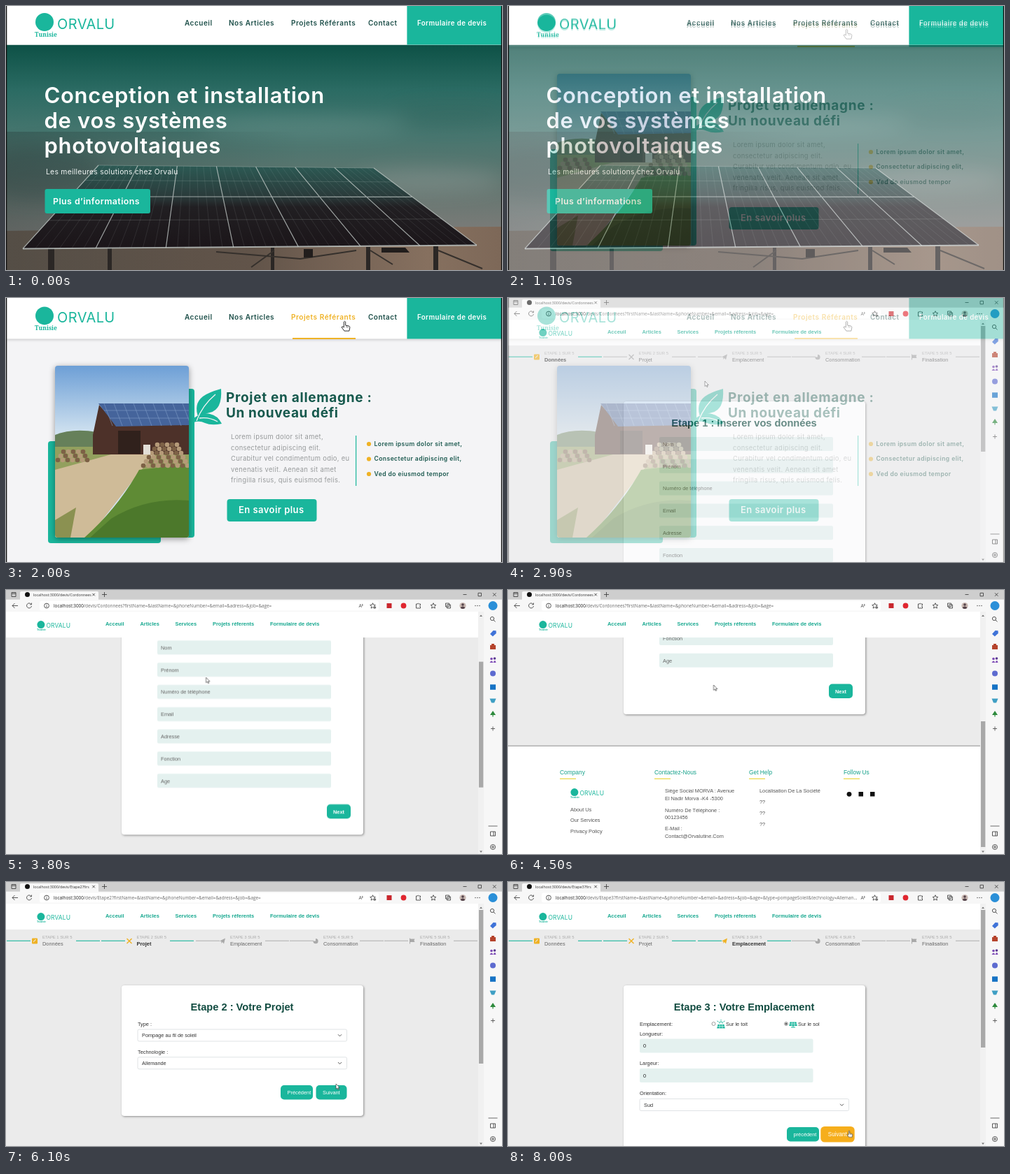
Recreate the animation shown at these times as an HTML page. Size 708 by 378 pixels, loop 8.1 s.

```html
<!DOCTYPE html>
<html lang="fr">
<head>
<meta charset="utf-8">
<title>Devis photovoltaïque</title>
<style>
html, body { margin: 0; width: 100%; height: 100%; overflow: hidden; background: #fff; }
svg { display: block; width: 100vw; height: 100vh; }
text { font-family: "Liberation Sans", Arial, sans-serif; white-space: pre; }
.m { font-family: Inter, "Open Sans", sans-serif; }
.s { font-family: "Open Sans", "Noto Sans", sans-serif; }
.card { fill: #fff; filter: drop-shadow(1.5px 1.5px 1.5px #8a8a8a); }
.shade { filter: drop-shadow(0 1px 2px #0003); }
.ln { fill: none; stroke: #444; stroke-width: .9; }

.project, .browser, .under, .hover, .p1, .p2, .p3, .scroll, .thumb,
.cursor, .arrow, .hand, .b1, .b2, .b3 { animation: 8.1s linear infinite; }

.project { animation-name: project; }
.browser { animation-name: browser; }
@keyframes project { 0%, 10.494% { opacity: 0 } 20.988%, 100% { opacity: 1 } }
@keyframes browser { 0%, 29.63% { opacity: 0 } 39.506%, 100% { opacity: 1 } }

.under { animation-name: under; transform-origin: 454px 58px; }
@keyframes under { 0%, 8.642% { transform: scaleX(0) } 13.58% { transform: scaleX(.9) } 16.05%, 100% { transform: none } }
.hover { animation-name: hover; }
@keyframes hover { 0%, 11.111% { fill: #1d4f49 } 17.284%, 100% { fill: #efb225 } }

.p1 { animation-name: p1; animation-timing-function: step-end; }
.p2 { animation-name: p2; animation-timing-function: step-end; }
.p3 { animation-name: p3; animation-timing-function: step-end; }
@keyframes p1 { 0% { visibility: visible } 65.432%, 100% { visibility: hidden } }
@keyframes p2 { 0% { visibility: hidden } 65.432% { visibility: visible } 85.185%, 100% { visibility: hidden } }
@keyframes p3 { 0% { visibility: hidden } 85.185%, 100% { visibility: visible } }

.scroll { animation-name: scroll; }
.thumb { animation-name: thumb; }
@keyframes scroll {
  0%, 40.741% { transform: none; animation-timing-function: ease-in-out }
  54.321%, 100% { transform: translateY(-299px) }
}
@keyframes thumb {
  0%, 40.741% { transform: none; animation-timing-function: ease-in-out }
  54.321%, 100% { transform: translateY(148px) }
}

.cursor { animation-name: cursor; }
@keyframes cursor {
  0%, 41.975% { transform: translate(281px, 119px) }
  55.556%, 58.025% { transform: translate(293.5px, 136px) }
  62.963%, 66.667% { transform: translate(474px, 143px) }
  74.074%, 77.778% { transform: translate(471px, 289px) }
  80.247%, 82.7% { transform: translate(473.5px, 304px) }
  82.716%, 92.593% { transform: translate(474.5px, 304.5px) }
  98.765%, 100% { transform: translate(487px, 356px) }
}
.arrow { animation-name: arrow; animation-timing-function: step-end; }
.hand { animation-name: hand; animation-timing-function: step-end; }
@keyframes arrow {
  0% { visibility: visible } 61.728% { visibility: hidden } 65.432% { visibility: visible }
  79.012% { visibility: hidden } 85.185% { visibility: visible } 97.531%, 100% { visibility: hidden }
}
@keyframes hand {
  0% { visibility: hidden } 61.728% { visibility: visible } 65.432% { visibility: hidden }
  79.012% { visibility: visible } 85.185% { visibility: hidden } 97.531%, 100% { visibility: visible }
}

.btn { fill: #1ab69c; transform-box: fill-box; transform-origin: center; }
.b1 { animation-name: b1; }
.b2 { animation-name: b2; }
.b3 { animation-name: b3; }
@keyframes b1 { 0%, 61.728% { fill: #1ab69c; transform: none } 64.198%, 100% { fill: #f6ae1c; transform: scale(1.1) } }
@keyframes b2 { 0%, 77.778% { fill: #1ab69c; transform: none } 80.247%, 100% { fill: #f6ae1c; transform: scale(1.1) } }
@keyframes b3 { 0%, 96.296% { fill: #1ab69c; transform: none } 98.765%, 100% { fill: #f6ae1c; transform: scale(1.1) } }
</style>
</head>
<body>
<svg id="stage" viewBox="0 0 708 378" preserveAspectRatio="none"></svg>
<script>
const TEAL = '#1ab69c', DARK = '#1d4f49', SUN = '#efb225';
const range = n => [...Array(n).keys()];
const each = (list, fn) => list.map(fn).join('');
const rect = (x, y, w, h, fill, more = '') =>
  `<rect x="${x}" y="${y}" width="${w}" height="${h}" ${fill ? `fill="${fill}"` : ''} ${more}/>`;
const dot = (x, y, r, fill) => `<circle cx="${x}" cy="${y}" r="${r}" fill="${fill}"/>`;
const path = (d, fill, more = '') => `<path d="${d}" fill="${fill}" ${more}/>`;
const line = (d, more = '') => `<path class="ln" d="${d}" ${more}/>`;
const text = (x, y, str, size, fill, more = '') =>
  `<text x="${x}" y="${y}" font-size="${size}" fill="${fill}" ${more}>${str}</text>`;
// wide geometric type for the two marketing pages
const wide = (x, y, str, size, fill, gap, weight = 600, cls = '') =>
  text(x, y, str, size, fill, `class="m ${cls}" font-weight="${weight}" letter-spacing="${gap}"`);

const logo = (x, y, k) => `<g transform="translate(${x} ${y}) scale(${k})">
  ${dot(14, 18, 13, TEAL)}
  ${wide(32, 28, 'ORVALU', 20, TEAL, .4, 400)}
  ${text(0, 39, 'Tunisie', 8.5, TEAL, 'font-weight="700" style="font-family:\'Noto Serif\',serif"')}</g>`;

const handShape = path('M-1 1Q0-.6 1 1V5.2L5 6Q6.4 6.4 6.2 8L5.4 12H-.5L-3.7 7.6Q-3.4 6-1.8 7L-1 7.8Z',
  '#fff', 'stroke="#222" stroke-width=".8" stroke-linejoin="round"') + line('M2 6v2M3.8 6.4v2', 'style="stroke-width:.6"');

const edges = rect(0, 0, 1.3, 378, '#111') + rect(706.8, 0, 1.2, 378, '#111');

// ---- marketing pages ----
const header = (dy, height, bar = '', current = '') => {
  const y = 28.3 + dy;
  return rect(0, 0, 708, height, '#fff', `class="${bar}"`) + logo(41, 5 + dy * .8, 1) +
    wide(255, y, 'Accueil', 10, DARK, .5) + wide(318, y, 'Nos Articles', 10, DARK, .5) +
    wide(407, y, 'Projets Référants', 10, DARK, .55, 600, current) +
    wide(517, y, 'Contact', 10, DARK, .48) +
    rect(572.4, 0, 136, height, TEAL) + wide(587, y, 'Formulaire de devis', 9.7, '#fff', .4);
};

const panels = () => {
  const top = u => [132 + 393 * u, 228 + 4 * u];
  const low = u => [24 + 648 * (u + .145 * u * (1 - u)), 347.5 - 5 * u];
  const at = (u, v) => top(u).map((a, i) => (a + (low(u)[i] - a) * v).toFixed(1)).join(' ');
  const col = u => `M${at(u, 0)}L${at(u, 1)}`, row = v => `M${at(0, v)}L${at(1, v)}`;
  const lines = (d, w, o) => path(d, 'none', `stroke="#c9d0ce" stroke-width="${w}" opacity="${o}"`);
  return path(`M${at(0, 0)}L${at(1, 0)}L${at(1, 1)}L${at(0, 1)}Z`, 'url(#glass)') +
    lines(each(range(42), i => col(i / 42)), .5, .22) + lines(row(.18) + row(.66), .6, .3) +
    lines(row(0), 1, .3) + lines(each(range(8), i => col(i / 7)) + row(.375), 1.2, .7) + lines(row(1), 1.8, .75);
};

const hero = `<g>
  ${rect(0, 55.5, 708, 323, 'url(#sky)')}
  <g filter="url(#soft)" opacity=".3">
    <ellipse cx="600" cy="250" rx="110" ry="16" fill="#a9b4b2"/>
    <ellipse cx="420" cy="172" rx="150" ry="12" fill="#8fb0ab"/>
    <ellipse cx="640" cy="155" rx="90" ry="14" fill="#2d5f59"/>
    <ellipse cx="50" cy="240" rx="90" ry="40" fill="#27413f"/>
  </g>
  ${path('M0 322L300 318L708 316V378H0Z', 'url(#sand)')}
  ${rect(0, 180, 708, 198, 'url(#dusk)')}
  ${path('M60 347h9v31h-9zM145 347h6v31h-6zM378 346h5v32h-5zM514 345h6v33h-6zM610 344h7v34h-7z', '#2b2725')}
  ${path('M300 352L420 362L500 350M383 350L350 374M520 350L552 370M617 350L680 376', 'none', 'stroke="#35302c" stroke-width="2"')}
  ${path('M425 348h13v12h-13zM536 346h34l6 7h-40z', '#211d1c')}
  ${panels()}
  ${header(0, 55.5)}
  ${each(['Conception et installation', 'de vos systèmes', 'photovoltaiques'], (s, i) => wide(54.5, 139 + 36 * i, s, 31, '#fff', .7))}
  ${wide(57, 240.5, 'Les meilleures solutions chez Orvalu', 10.3, '#f2f6f5', .3, 400)}
  ${rect(55.5, 262, 150.5, 35, TEAL, 'rx="3"')}
  ${wide(67, 284, 'Plus d’informations', 12.4, '#fff', .43)}
  ${edges}</g>`;

const logs = (x, y, cols, rows) => each(range(rows), r => each(range(cols - r), c =>
  dot(x + c * 7 + r * 4, y - r * 6, 3.3, (r + c) % 2 ? '#b59a78' : '#7d6146')));

const photo = `<g clip-path="url(#frame)">
  ${rect(70, 97, 191, 246, 'url(#day)')}
  ${path('M70 196Q95 186 130 192V216H70Z', '#66805a')}
  ${path('M70 213H261V260H70Z', '#93a05e')}
  ${path('M133 153L158 182L261 180V224H124V196Z', '#4d3129')}
  ${path('M160 190h32v33h-32z', '#30211c')}
  ${path('M132 151L261 151V182L157 184Z', '#45649b')}
  ${path(each(range(9), i => `M${140 + i * 14} 151l12 32`) + 'M140 161H261M148 172H261', 'none', 'stroke="#7f9bc6" stroke-width=".6"')}
  ${path('M70 246L150 224H212L190 250L118 343H70Z', '#cfbb98')}
  ${path('M70 318L100 300L92 343H70Z', '#8b9151')}
  ${path('M190 246L261 238V343H112Q160 300 190 246Z', '#5f8b35')}
  ${path('M150 316Q200 285 261 290V343H120Z', '#4c782b')}
  ${logs(196, 240, 10, 6)}${logs(74, 232, 7, 3)}
  ${path('M196 210h10v14h-10z', '#e3ded6')}</g>`;

const project = `<g class="project">
  ${rect(0, 0, 708, 378, '#f4f4f6')}
  ${header(3, 58.5, 'shade', 'hover')}
  ${rect(409, 57, 90, 2, SUN, 'class="under"')}
  ${rect(60, 205, 161, 146, TEAL, 'rx="4"')}${rect(165, 130, 104, 213, TEAL, 'rx="4"')}
  ${rect(70, 97, 191, 246, '#ddd', 'rx="4" style="filter:drop-shadow(0 2px 4px #0006)"')}
  ${photo}
  ${path('M307 130Q309 160 291 164Q281 166 275 172Q267 152 281 141Q289 135 307 130Z', TEAL)}
  ${path('M268 172Q281 163 291 166Q302 168 308 180Q293 183 284 179Q276 175 268 178Z', TEAL)}
  ${path('M272 176Q280 154 299 138M276 172Q290 170 302 177', 'none', 'stroke="#f4f4f6" stroke-width="1.3"')}
  ${wide(314, 149, 'Projet en allemagne :', 19, '#16594d', .7, 700)}
  ${wide(314, 171, 'Un nouveau défi', 19, '#16594d', .6, 700)}
  ${each(['Lorem ipsum dolor sit amet,', 'consectetur adipiscing elit.', 'Curabitur vel condimentum odio, eu',
    'venenatis velit. Aenean sit amet', 'fringilla risus, quis euismod felis.'],
    (s, i) => wide(321, 202 + 15.5 * i, s, 9.4, '#979a9b', .33, 400))}
  ${rect(499, 197, 1.2, 72, TEAL)}
  ${each(['Lorem ipsum dolor sit amet,', 'Consectetur adipiscing elit,', 'Ved do eiusmod tempor'],
    (s, i) => dot(518, 209 + 21.5 * i, 3.1, SUN) + wide(525.5, 212 + 21.4 * i, s, 8.6, '#1d5a50', .4))}
  ${rect(315.5, 288, 128, 32, TEAL, 'rx="4"')}
  ${wide(332, 307.5, 'En savoir plus', 13, '#fff', .45)}
  ${edges}
  <g transform="translate(483.5 33) scale(1.18)">${handShape}</g></g>`;

// ---- quote form in the browser ----
const label = (x, y, s, fill = '#333') => text(x, y, s, 7.35, fill);
const field = (x, y, w, s, fill = '#666') => rect(x, y, w, 20, '#e4f1ef', 'rx="2"') + label(x + 5, y + 12.7, s, fill);
const select = (y, s) => rect(188, y, 298.5, 17, '#fff', 'rx="2" stroke="#d9dcdf" stroke-width=".8"') +
  label(194, y + 11.1, s) + line(`M474 ${y + 7.3}l2.5 2.5 2.5-2.5`);
const button = (x, y, w, s, cls = '', tx = 9.5, more = '') =>
  `<g class="btn ${cls}">${rect(x, y, w, 20.5, '', 'rx="5"')}${text(x + tx, y + 13, s, 7.4, '#fff', more)}</g>`;
const title = s => text(337, 184, s, 14.65, '#124c41', 'font-weight="700" text-anchor="middle"');
const card = h => rect(165, 148, 345, h, '', 'class="card" rx="4"');

const steps = [[41, 52, 'Données'], [176, 186.5, 'Projet'], [309, 320, 'Emplacement'], [442, 453, 'Consommation'], [580, 591, 'Finalisation']];
const icons = [
  'M-4-3Q-4-4-3-4H3Q4-4 4-3V3Q4 4 3 4H-3Q-4 4-4 3ZM-2 2L2-2L1-2.5L-2 .8Z',
  'M-4-3L-3-4L0-1L3-4L4-3L1 0L4 3L3 4L0 1L-3 4L-4 3L-1 0Z',
  'M-4 0L4-4L2 4L0 1.5L-2 3.5L-1.5 .8Z',
  'M0-3.5A3.6 3.6 0 1 1-3.6 0H0Z',
  'M-4-4h1v1h6.5l-1 2.2 1 2.3h-6.5V4h-1Z'];
const bars = [1, 100, 136, 234, 271, 370, 405, 505, 540, 639];
const stepper = now =>
  each(bars, (x, i) => rect(x, 83.7, 34, 1.1, i < now * 2 ? TEAL : '#b4b4b4')) +
  each(steps, ([ix, tx, s], i) =>
    path(icons[i], i < now ? SUN : '#a9a9a9', `fill-rule="evenodd" transform="translate(${ix} 84.5)"`) +
    text(tx, 80.5, `ETAPE ${i + 1} SUR 5`, 5.85, '#aaa') +
    text(tx, 91.3, s, 7.4, i + 1 === now ? '#333' : '#666', i + 1 === now ? 'font-weight="700"' : ''));

const footerCols = [[74, 'Company'], [209, 'Contactez-Nous'], [344, 'Get Help'], [479, 'Follow Us']];
const footerText = [
  [89, [[316.5, 'About Us'], [332, 'Our Services'], [347.5, 'Privacy Policy']]],
  [224, [[290, 'Siège Social MORVA : Avenue'], [301, 'El Nadir Morva -K4 -5300'], [317.5, 'Numéro De Téléphone :'],
    [328, '00123456'], [344, 'E-Mail :'], [355, 'Contact@Orvalutine.Com']]],
  [359, [[290, 'Localisation De La Société'], [306, '??'], [322, '??'], [337.5, '??']]]];
const footer = `<g transform="translate(0 299)">
  ${rect(0, 223, 674, 156, '#fff')}${rect(0, 222.7, 674, 1, '#8c8c8c')}
  ${each(footerCols, ([x, s]) => text(x, 264, s, 8.4, '#17a28b') + rect(x, 269.7, 23, 1.2, '#ecd640'))}
  ${logo(89, 282, .42)}
  ${each(footerText, ([x, rows]) => each(rows, ([y, s]) => label(x, y, s, '#555')))}
  ${dot(487, 292.3, 3.4, '#111')}${rect(500.5, 289, 6.5, 6.5, '#111')}${rect(517, 289, 6.5, 6.5, '#111')}</g>`;

const page1 = `<g class="p1"><g class="scroll">
  ${stepper(1)}${card(329)}${title('Etape 1 : Inserer vos données')}
  ${each(['Nom', 'Prénom', 'Numéro de téléphone', 'Email', 'Adresse', 'Fonction', 'Age'], (s, i) => field(216, 199 + 31.8 * i, 248, s))}
  ${button(458, 433.5, 34, 'Next', 'b1', 9, 'font-weight="700"')}
  ${footer}</g></g>`;

const page2 = `<g class="p2">
  ${stepper(2)}${card(187)}${title('Etape 2 : Votre Projet')}
  ${label(188, 205.5, 'Type :')}${select(211, 'Pompage au fil de soleil')}
  ${label(188, 245.5, 'Technologie :')}${select(250.8, 'Allemande')}
  ${button(392, 291, 46, 'Précédent')}${button(442.5, 291, 44, 'Suivant', 'b2')}</g>`;

const panelIcon = (x, y) => path(`M${x - 4.5} ${y}h9l1.3 5.5h-11.6z`, TEAL) +
  path(`M${x - 5} ${y + 2.7}h10M${x - 1.5} ${y}l-.5 5.5M${x + 1.5} ${y}l.5 5.5`, 'none', 'stroke="#fff" stroke-width=".6"');
const radio = (x, on) => `<circle cx="${x}" cy="203" r="2.5" fill="#fff" stroke="#777" stroke-width=".7"/>` + (on ? dot(x, 203, 1.5, '#555') : '');
const page3 = `<g class="p3">
  ${stepper(3)}${card(260)}${title('Etape 3 : Votre Emplacement')}
  ${label(188, 205.5, 'Emplacement:')}
  ${radio(293.5)}${panelIcon(304, 204)}
  ${path('M301.5 202.5a2.5 2.5 0 0 1 5 0M298.5 199l2 1.2M309.5 199l-2 1.2M304 197v1.5', 'none', `stroke="${TEAL}"`)}
  ${label(311, 206, 'Sur le toit')}
  ${radio(397, true)}${panelIcon(407, 200.5)}${rect(406.5, 206, 1, 2, TEAL)}${rect(404, 207.5, 6, 1, TEAL)}
  ${label(414, 206, 'Sur le sol')}
  ${label(188, 219.5, 'Longueur:')}${field(188, 224.5, 247.5, '0', '#222')}
  ${label(188, 262, 'Largeur:')}${field(188, 267, 247.5, '0', '#222')}
  ${label(188, 304.5, 'Orientation:')}${select(310.5, 'Sud')}
  ${button(398, 351, 46, 'précédent')}${button(448.5, 351, 44, 'Suivant', 'b3')}</g>`;

const siteNav = rect(0, 31, 674, 37, '#fff') + logo(44, 42, .42) +
  each([[142, 'Acceuil'], [191.5, 'Articles'], [241.5, 'Services'], [295, 'Projets réferents'], [377, 'Formulaire de devis']],
    ([x, s]) => text(x, 51.2, s, 7.45, '#16a88f', 'font-weight="700"'));

const query = '?firstName=&amp;lastName=&amp;phoneNumber=&amp;email=&amp;adress=&amp;job=&amp;age=';
const address = (cls, name, tab, extra = '') => `<g class="${cls}">
  ${text(39, 8.8, `localhost:3000/devis/${tab}`, 5.33, '#333', 'class="s"')}
  ${text(68, 25, `<tspan fill="#222">localhost:3000</tspan>/devis/${name}${query}${extra}`, 6.35, '#6b6b6b', 'class="s"')}</g>`;
const star = (x, y) => line(`M${x} ${y - 3.8}l1.1 2.5 2.7.3-2 1.9.6 2.7-2.4-1.4-2.4 1.4.6-2.7-2-1.9 2.7-.3z`);

const chrome = `
  ${rect(0, 0, 708, 14, '#cecece')}${path('M20 14V4Q20 2 22 2H130Q132 2 132 4V14Z', '#f7f7f7')}
  ${rect(0, 13.7, 708, 17.5, '#f7f7f7')}${rect(48, 15.5, 484, 14, '#fff', 'rx="3"')}
  ${line('M8 3.5h6v6h-6zM8 5.2h6')}${dot(30.5, 6.5, 3.5, '#111')}
  ${line('M123.3 4.8l3.6 3.6M126.9 4.8l-3.6 3.6M137 6.5h7M140.5 3v7M652.5 6.5h5M674 4.3h4.5v4.5h-4.5zM695 4.3l4.5 4.5M699.5 4.3l-4.5 4.5')}
  ${line('M17 22.5h-8M12.5 19l-3.5 3.5 3.5 3.5M36 20.5a3.5 3.5 0 1 0 .5 2.5M36.5 18.5v2.3h-2.3')}
  <circle class="ln" cx="58" cy="22.5" r="3.4"/>${line('M58 22v2.5M58 20.3v.8')}
  ${text(503.5, 25, 'A', 7, '#555', 'class="s"')}${line('M508.5 20q1 1.5 0 3')}
  ${star(523.5, 22.5)}${dot(526.5, 25, 1.8, '#777')}
  ${rect(543.5, 19, 7, 7, '#c8262c')}${dot(567.5, 22.5, 3.9, '#e0262f')}
  ${line('M585.5 20h2q.5-2 2 0h2v2q-2 .5 0 2v2h-6z')}${star(610, 22.5)}
  ${line('M627.5 19h5v5h-5zM629.5 21h5v5h-5z')}
  ${dot(652, 22.5, 4.6, '#c9b8b2')}${path('M648.5 25.5Q652 21.5 655.5 25.5Q652 28.5 648.5 25.5Z', '#54434a')}${dot(652, 21, 1.8, '#54434a')}
  ${each([670, 673, 676], x => dot(x, 22.5, .7, '#444'))}
  ${address('p1', 'Cordonnees', 'Cordonnees')}
  ${address('p2', 'Etape2', 'Etape2?firs')}
  ${address('p3', 'Etape3', 'Etape3?firs', '&amp;type=pompageSoleil&amp;technology=Alleman...')}`;

const thumb = (h, cls = '') => rect(675, 40, 6.3, h, '#a9a9a9', `class="${cls}"`);
const sidebar = `
  ${rect(674, 31, 8, 347, '#f1f1f1')}
  ${path('M676 38l2-2.5 2 2.5zM676 373.5l2 2.5 2-2.5z', '#777')}
  <g class="p1">${thumb(180, 'thumb')}</g>${thumb(220, 'p2')}${thumb(197, 'p3')}
  ${rect(682, 14, 26, 364, '#f7f7f7')}${dot(695, 22.5, 6.5, '#2a8fd8')}
  <circle class="ln" cx="694" cy="41" r="2.6"/>${line('M696 43l2.5 2.5')}
  ${path('M691 63l4.5-5 4 .3.3 3.7-5 4.5z', '#3f73d8')}
  ${path('M691 79h8v6h-8zM693 79v-2h4v2z', '#b5432c')}
  ${dot(693, 98.5, 1.8, '#7d4bb5')}${dot(697.5, 98, 1.8, '#5b3a91')}${path('M690.5 104q2.5-5 5 0zM695.5 104q2.5-6 4 0z', '#7d4bb5')}
  ${dot(695, 119.5, 4, '#5d6bd0')}${rect(691, 135.3, 8, 7.5, '#1673c5')}
  ${path('M690.5 155.5h9l-2.5 6h-4z', '#3f9fc4')}
  ${path('M695 173l4 6h-8zM694.4 179h1.2v2.5h-1.2z', '#2d8a3c')}
  ${line('M692 198.5h6M695 195.5v6M688.5 338h13', 'style="stroke-width:.8"')}
  ${line('M691.5 346h7v6h-7zM696 346v6')}
  <circle class="ln" cx="695" cy="368" r="3.5"/><circle class="ln" cx="695" cy="368" r="1.3"/>`;

const browser = `<g class="browser">
  ${rect(0, 0, 708, 378, '#ebebeb')}${page1}${page2}${page3}${siteNav}${chrome}${sidebar}
  <g class="cursor">
    <g class="arrow">${path('M0 0V7.5L1.8 6L3 8.5L4.2 8L3.1 5.5H5.3Z', '#fff', 'stroke="#222" stroke-width=".6"')}</g>
    <g class="hand" transform="scale(.78)">${handShape}</g>
  </g></g>`;

const stops = list => each(list, ([at, c, o = 1]) => `<stop offset="${at}" stop-color="${c}" stop-opacity="${o}"/>`);
const down = (id, list) => `<linearGradient id="${id}" x2="0" y2="1">${stops(list)}</linearGradient>`;
const across = (id, list) => `<linearGradient id="${id}">${stops(list)}</linearGradient>`;
const defs = `<defs>
  ${down('sky', [[0, '#0d5146'], [.2, '#2b6b63'], [.4, '#47766f'], [.62, '#61756f'], [.82, '#7a7b78']])}
  ${across('sand', [[0, '#6b5c51'], [.5, '#65564b'], [.85, '#86705f'], [1, '#7d6858']])}
  ${across('dusk', [[0, '#1f2c2b', .3], [.6, '#1f2c2b', 0]])}
  ${down('glass', [[0, '#2c5a54'], [.38, '#2a3a3a'], [.5, '#211f22'], [1, '#1b1519']])}
  ${down('day', [[0, '#6d9fd6'], [.4, '#d2e3f0']])}
  <filter id="soft" x="-30%" y="-30%" width="160%" height="160%"><feGaussianBlur stdDeviation="14"/></filter>
  <clipPath id="frame">${rect(70, 97, 191, 246, '', 'rx="4"')}</clipPath></defs>`;

document.getElementById('stage').innerHTML = defs + hero + project + browser;
</script>
</body>
</html>
```
